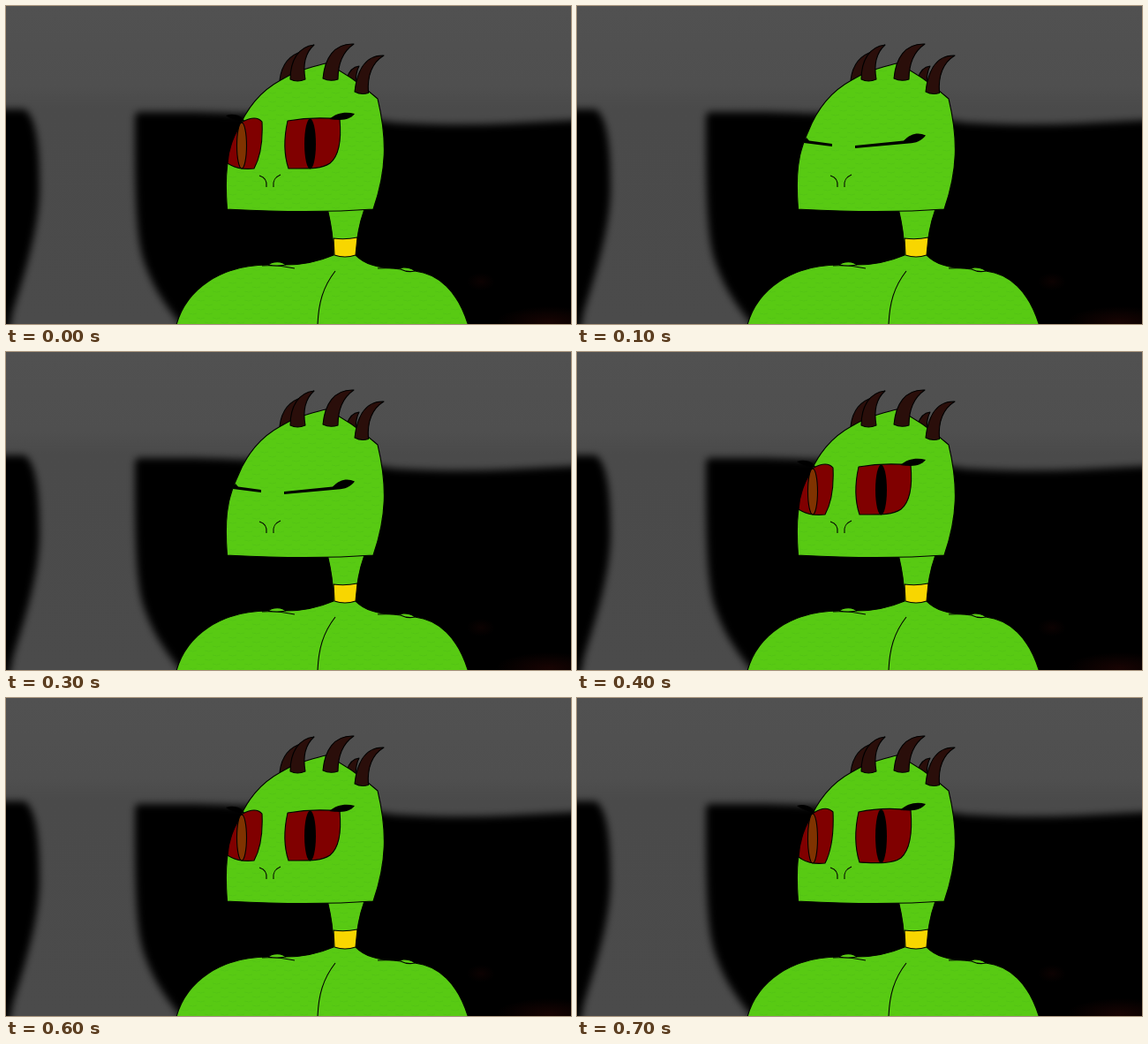
Write an HTML page that moves like this. It is 640x360 px and loops after 4.7 s.

```html
<!DOCTYPE html>
<html lang="en">
<head>
<meta charset="utf-8">
<title>Blinking lizard</title>
<style>
html, body { margin: 0; width: 100%; height: 100%; overflow: hidden; background: #000; }
svg { display: block; width: 100vw; height: 100vh; }
.line { fill: none; }
.ink { stroke: #000; stroke-width: 1.1; stroke-linejoin: round; }
.horn { fill: #2a0e0a; }
.red { fill: #800000; }
.lids { visibility: hidden; animation: 4700ms step-end infinite; }
.half { animation-name: half; }
.shut { animation-name: shut; }
.wide { animation-name: wide; }
/* one step is 100 ms of 4700 */
@keyframes half {
  0%, 4.2553%, 8.5106%, 12.766% { visibility: visible; }
  2.1277%, 6.383%, 10.6383%, 14.8936%, 100% { visibility: hidden; }
}
@keyframes shut {
  0%, 4.2553%, 8.5106%, 12.766%, 100% { visibility: hidden; }
  2.1277%, 6.383%, 10.6383% { visibility: visible; }
}
@keyframes wide {
  0% { visibility: hidden; }
  14.8936%, 100% { visibility: visible; }
}
</style>
</head>
<body>
<svg viewBox="0 0 640 360" preserveAspectRatio="none">
  <defs>
    <linearGradient id="wall" x2="0" y2="1">
      <stop offset="0" stop-color="#515151"/>
      <stop offset=".25" stop-color="#4f4f4f"/>
      <stop offset=".32" stop-color="#4a4a4a"/>
      <stop offset="1" stop-color="#4b4b4b"/>
    </linearGradient>
    <radialGradient id="ember">
      <stop offset="0" stop-color="#180403"/>
      <stop offset="1" stop-color="#180403" stop-opacity="0"/>
    </radialGradient>
    <filter id="soft" x="-10%" y="-10%" width="120%" height="120%">
      <feGaussianBlur stdDeviation="4"/>
    </filter>
    <pattern id="skin" width="18" height="10" patternUnits="userSpaceOnUse">
      <path fill="#58ca13" d="M0 0H18V10H0Z"/>
      <path fill="none" stroke="#4fbf12" stroke-opacity=".55" d="M0 3Q5 5 9 3M9 8Q14 10 18 8"/>
    </pattern>
  </defs>

  <path fill="url(#wall)" d="M0 0H640V360H0Z"/>
  <g filter="url(#soft)">
    <path d="M-20 117H21C36 126 38 170 38 205C38 250 22 300 8 345L0 385H-20Z"/>
    <path d="M149 120H215C300 123 400 124 440 132Q510 136 570 133L665 128V385H220C183 345 166 320 155 285C146 255 146 190 146 124Z"/>
  </g>
  <ellipse cx="615" cy="358" rx="60" ry="18" fill="url(#ember)"/>
  <ellipse cx="538" cy="312" rx="16" ry="10" fill="url(#ember)" opacity=".5"/>

  <g class="ink" fill="url(#skin)">
    <path d="M364.500 231C368 246 371 262 371 282C352 290 335 293 317 293C313 289 303 288 297 293C243 293 204 321 193 361H523.500C512 323 490 303 463 300C459 296 449 295 447 297C420 297 406 292 396 282C397 262 400 247 406 230Z"/>
    <path class="line" d="M290 294Q308 293 327 297M297 293Q307 295 317 293M421 297Q435 296 447 298Q455 302 463 300M373 300C359 318 354 336 353 361"/>
    <path fill="#f8d600" d="M371 263Q384 265 398 262L396 282Q384 286 372 282Z"/>
    <g class="horn">
      <path d="M310 84C312 67 321 55 337 51C329 61 324 71 323 83Z"/>
      <path d="M386 82Q390 69 400 68Q396 75 396 90Z"/>
    </g>
    <path d="M250.500 230C247.500 192 250 166 262 142C271 119 287 97 311 84C329 73 344 70 362 65C384 75 404 90 421 105C432 151 431 187 416 230Q345 235 250.500 230Z"/>
    <g class="horn">
      <path d="M322 83C322 62 331 46 349 44C339 53 336 66 339 83Q330 87 322 83Z"/>
      <path d="M359 82C361 60 371 42 394 43C381 52 376 66 376 83Q367 86 359 82Z"/>
      <path d="M395 97C397 79 404 55 428 56C415 64 409 79 410.500 98.500Q402 101 395 97Z"/>
    </g>
    <path class="line" d="M287 192C294 194 296 198 295 205M311 191C304 194 302 198 303 205"/>
  </g>

  <g class="lids half">
    <g class="ink red">
      <path d="M268 131Q283 123 290 131C291 151 288 171 281 184Q263 186 251 178C252 163 257 147 268 131Z"/>
      <path d="M319 130Q348 125 378 128C380 150 378 169 367 178C357 185 341 184 320 184C314 166 315 148 319 130Z"/>
      <ellipse cx="267" cy="158" rx="5.500" ry="26" fill="#803300"/>
    </g>
    <ellipse cx="344.500" cy="156" rx="6.500" ry="28.500"/>
    <path d="M249 124C258 121 267 124 270 130Q259 131 249 124Z"/>
    <path d="M366 128C374 121 385 119 395 122C389 129 382 130 366 128Z"/>
  </g>

  <g class="lids shut">
    <path d="M257 152L260 149L263 152.500L289 156V159L257 155Z"/>
    <path d="M315 158L370 152.500C378 144 387 142.500 395 146.500C390 153 384 155 376 155.500L315 161Z"/>
  </g>

  <g class="lids wide">
    <g class="ink red">
      <path d="M268 130Q282 121 290 129C291 152 288 173 281 187Q263 189 251 180C252 163 257 146 268 130Z"/>
      <path d="M319 129Q348 123 378 127C380 151 378 171 367 181C357 188 341 187 320 186C314 167 315 147 319 129Z"/>
      <ellipse cx="267" cy="159" rx="5.500" ry="28" fill="#803300"/>
    </g>
    <ellipse cx="344.500" cy="156.500" rx="6.500" ry="30.500"/>
    <path d="M249 122C258 119 267 123 270 130Q259 129 249 122Z"/>
    <path d="M366 127C374 119 385 117 395 120C389 127 382 128 366 127Z"/>
  </g>
</svg>
</body>
</html>
```
